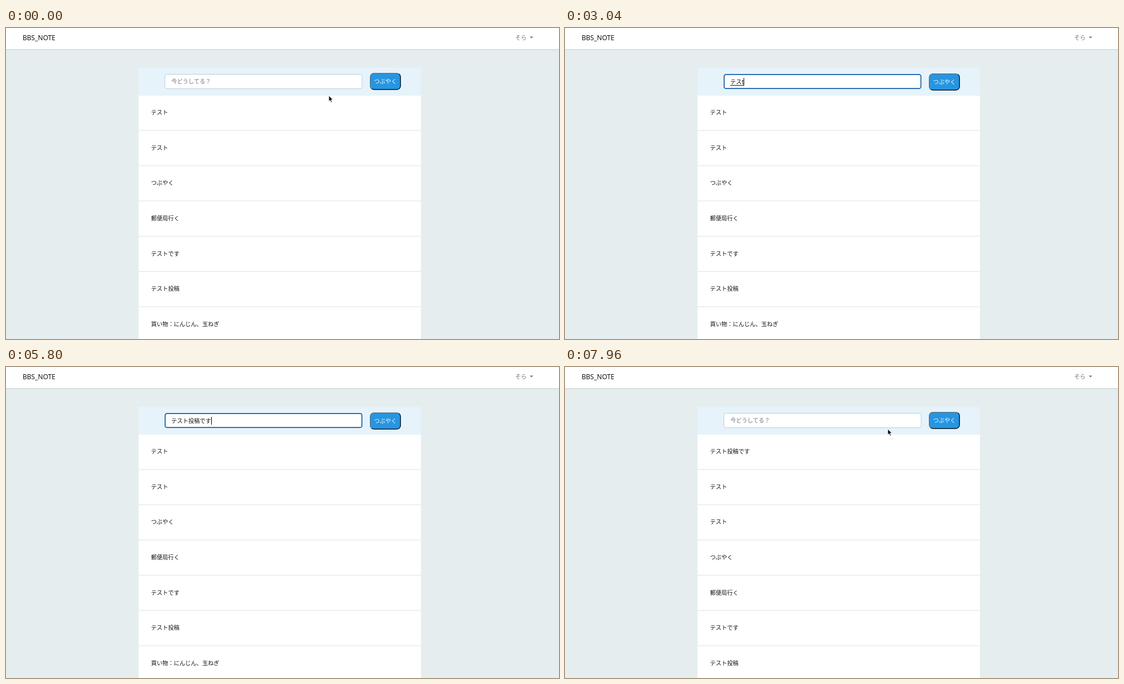
An HTML page that plays this animation: 997 by 561 pixels, repeating every 8000 ms.

```html
<!DOCTYPE html>
<html lang="ja">
<head>
<meta charset="utf-8">
<style>
  html, body { margin: 0; width: 100%; height: 100%; overflow: hidden; background: #e5edef; }
  svg { display: block; }
  text { font: 10.25px "Noto Sans CJK JP", "Noto Sans CJK", sans-serif; fill: #101214; white-space: pre; }
  .brand { font: 12px "Noto Sans", "Open Sans", sans-serif; }
  .muted { fill: #6f767b; }
  #menu text { font-size: 8.6px; font-weight: 500; fill: #000; }
</style>
</head>
<body>
<svg width="997" height="561" viewBox="0 0 997 561">
  <defs>
    <linearGradient id="bevel" x2="1" y2="1">
      <stop offset=".5" stop-color="#5f7586"/>
      <stop offset=".5" stop-color="#0b1722"/>
    </linearGradient>
    <linearGradient id="pressed" x2="1" y2="1">
      <stop offset=".5" stop-color="#0b1722"/>
      <stop offset=".5" stop-color="#5f7586"/>
    </linearGradient>
    <filter id="shadow" x="-10%" y="-10%" width="120%" height="130%">
      <feDropShadow dx="0" dy="1" stdDeviation="1.2" flood-opacity=".28"/>
    </filter>
    <filter id="navShadow" x="-1%" y="-10%" width="102%" height="130%">
      <feDropShadow dx="0" dy="1.2" stdDeviation="1.2" flood-opacity=".1"/>
    </filter>
  </defs>

  <rect x="-5" y="-5" width="1007" height="43" fill="#fff" filter="url(#navShadow)"/>
  <text class="brand" x="30" y="22">BBS_NOTE</text>
  <text class="muted" x="918" y="20.9">そら</text>
  <path d="M944.3 15.6h6.2l-3.1 3.2z" fill="#6f767b"/>

  <rect x="239" y="72" width="509" height="50" fill="#e6f3fa"/>
  <g id="posts"></g>

  <rect id="field" rx="3.5" fill="#fff"/>
  <text id="hint" class="muted" x="298" y="99.9">今どうしてる？</text>
  <text id="typed" x="298" y="100.9"></text>
  <rect id="underline" y="103" height="1" fill="#111"/>
  <rect id="caret" width="1" height="14" fill="#000"/>

  <g id="button">
    <rect id="buttonFace" x="656.7" y="81.7" width="54.6" height="29.3" rx="6.5" fill="#2795e1" stroke-width="1.4"/>
    <text x="663.5" y="99.9" style="fill:#fff">つぶやく</text>
  </g>

  <g id="menu">
    <rect id="menuBox" x="286" y="110.5" width="138" rx="2.5" fill="#fff" filter="url(#shadow)"/>
    <g id="menuItems"></g>
  </g>

  <g id="pointer" stroke-linejoin="round">
    <path id="arrow" d="M0 0V10.3L2.4 8.2L4.1 12.2L5.8 11.5L4.1 7.6H7.3Z" stroke="#fff" stroke-width=".8"/>
    <path id="beam" d="M-2.6 -5Q-.4 -5 0 -4Q.4 -5 2.6 -5M0 -4V4.5M-2.6 5.5Q-.4 5.5 0 4.5Q.4 5.5 2.6 5.5M-1.3 1.5H1.3" fill="none" stroke="#111"/>
    <path id="hand" d="M-1 .3Q0 -1 1 .3L1.6 3.4Q2.7 2.7 3.2 3.7Q4.4 3.2 4.8 4.3Q6 4.1 6 5.5L5.4 8.6L4.8 11H-.2L-1 9.4L-3.5 6.4Q-3.6 4.7-2 5.3L-.3 6.6Z" fill="#fff" stroke="#111" stroke-width=".9"/>
  </g>
</svg>

<script>
const DURATION = 8000;
const $ = id => document.getElementById(id);
const show = (id, visible) => { $(id).style.display = visible ? '' : 'none'; };
const set = (id, attrs) => { for (const k in attrs) $(id).setAttribute(k, attrs[k]); };

const NEW_POST = 'テスト投稿です';
const POSTS = ['テスト', 'テスト', 'つぶやく', '郵便局行く', 'テストです', 'テスト投稿', '買い物：にんじん、玉ねぎ'];
const RECENT = ['テスト', 'テストです', 'testです〜', 'お菓子を食べる', '明日１４時〜　歯医者', '買い物：にんじん、玉ねぎ'];
const MATCHES = ['テスト', 'テストです', 'テスト投稿', 'テスト投稿です'];

// time, field text, number of confirmed characters, suggestions open
const TYPING = [
  [0, '', 0, 0], [1560, '', 0, 1], [2000, 't', 0, 0], [2240, 'て', 0, 0], [2440, 'てs', 0, 0],
  [2680, 'てす', 0, 0], [2840, 'テス', 0, 1], [2920, 'テス', 0, 0], [3040, 'テスt', 0, 0],
  [3200, 'テスト', 0, 1], [3280, 'テスト', 0, 0], [3480, 'テスト', 3, 1],
  [3800, 'テストt', 3, 1], [3840, 'テストt', 3, 0], [3960, 'テストと', 3, 0], [4040, 'テストとう', 3, 0],
  [4240, 'テストとうk', 3, 0], [4360, 'テストとうこ', 3, 0], [4560, 'テスト投稿', 3, 1],
  [4640, 'テスト投稿d', 3, 0], [4840, 'テスト投稿で', 3, 1], [4920, 'テスト投稿でs', 3, 0],
  [5080, NEW_POST, 3, 1], [5160, NEW_POST, 3, 0], [5560, NEW_POST, 7, 0], [7200, '', 0, 0]
];

// time, x, y
const POINTER = [
  [0, 582, 122], [480, 582, 122], [800, 567, 98], [920, 567, 98], [1160, 564, 100], [5920, 564, 100],
  [6240, 740, 113], [6560, 696, 99], [6720, 696, 99], [6760, 697, 100], [7480, 697, 100], [7960, 582, 112]
];

const clamp = v => Math.max(0, Math.min(1, v));
const ease = v => v * v * (3 - 2 * v);
const lastBefore = (list, t) => list.findLastIndex(entry => entry[0] <= t);

function pointerAt(t) {
  const i = lastBefore(POINTER, t);
  const [t0, x0, y0] = POINTER[i];
  const [t1, x1, y1] = POINTER[i + 1] || [DURATION, x0, y0];
  const k = ease(clamp((t - t0) / (t1 - t0)));
  return [x0 + (x1 - x0) * k, y0 + (y1 - y0) * k];
}

function drawPosts(posts) {
  $('posts').innerHTML = posts.slice(0, 7).map((post, i) => {
    const top = 122 + 63.6 * i;
    return `<rect x="239" y="${top}" width="509" height="62" fill="#fff"/>
      <text x="261.5" y="${top + 34.2}">${post}</text>`;
  }).join('');
}

function drawMenu(text) {
  const stem = text.replace(/[a-z]$/, '');
  const items = stem ? MATCHES.filter(m => m.startsWith(stem)) : RECENT;
  set('menuBox', { height: 11.5 + 25.7 * items.length });
  $('menuItems').innerHTML = items.map((item, i) =>
    `<text x="295" y="${132.3 + 25.7 * i}">${item}</text>`).join('');
}

function drawField(t) {
  const focus = clamp((t - 1520) / 160) * (1 - clamp((t - 6920) / 120));
  const stroke = 1 + focus * .7;
  const mix = (a, b) => Math.round(a + (b - a) * focus);
  set('field', {
    x: 286 + stroke / 2, y: 83 + stroke / 2, width: 356.5 - stroke, height: 27 - stroke,
    'stroke-width': stroke, stroke: `rgb(${mix(188, 15)},${mix(207, 91)},${mix(218, 174)})`
  });
  return focus;
}

function drawTyping(t, focus) {
  const [, text, confirmed, open] = TYPING[lastBefore(TYPING, t)];
  const typed = $('typed');
  if (typed.textContent !== text) typed.textContent = text;
  const end = text ? typed.getComputedTextLength() : 0;
  const start = text && confirmed ? typed.getSubStringLength(0, confirmed) : 0;
  show('hint', !text);
  show('underline', confirmed < text.length);
  set('underline', { x: 298 + start, width: Math.max(0, end - start) });
  const blinkedOff = t >= 5960 && t < 6480;
  show('caret', focus > 0 && t < 6960 && !blinkedOff);
  set('caret', { x: Math.round(297.8 + end), y: text ? 90 : 89 });
  show('menu', open);
  if (open) drawMenu(text);
  set('button', { transform: `translate(0 ${text ? 1 : 0})` });
  set('buttonFace', { stroke: `url(#${t >= 6960 && t < 7040 ? 'pressed' : 'bevel'})` });
}

function drawPointer(t) {
  const [x, y] = pointerAt(t);
  const inside = (l, top, r, b) => x > l && x < r && y > top && y < b;
  const overField = inside(286, 83, 642, 110);
  const overButton = inside(656, 81, 712, 112);
  show('pointer', t < 2000 || t >= 5960);
  show('beam', overField);
  show('hand', overButton);
  show('arrow', !overField && !overButton);
  set('pointer', { transform: `translate(${x} ${y})` });
}

let posted = null;
function render(now) {
  const t = Math.floor(now % DURATION / 40) * 40;
  const isPosted = t >= 7200;
  if (posted !== isPosted) {
    posted = isPosted;
    drawPosts(posted ? [NEW_POST, ...POSTS] : POSTS);
  }
  drawTyping(t, drawField(t));
  drawPointer(t);
}

const began = performance.now();
(function loop() {
  render(performance.now() - began);
  requestAnimationFrame(loop);
})();
</script>
</body>
</html>
```
